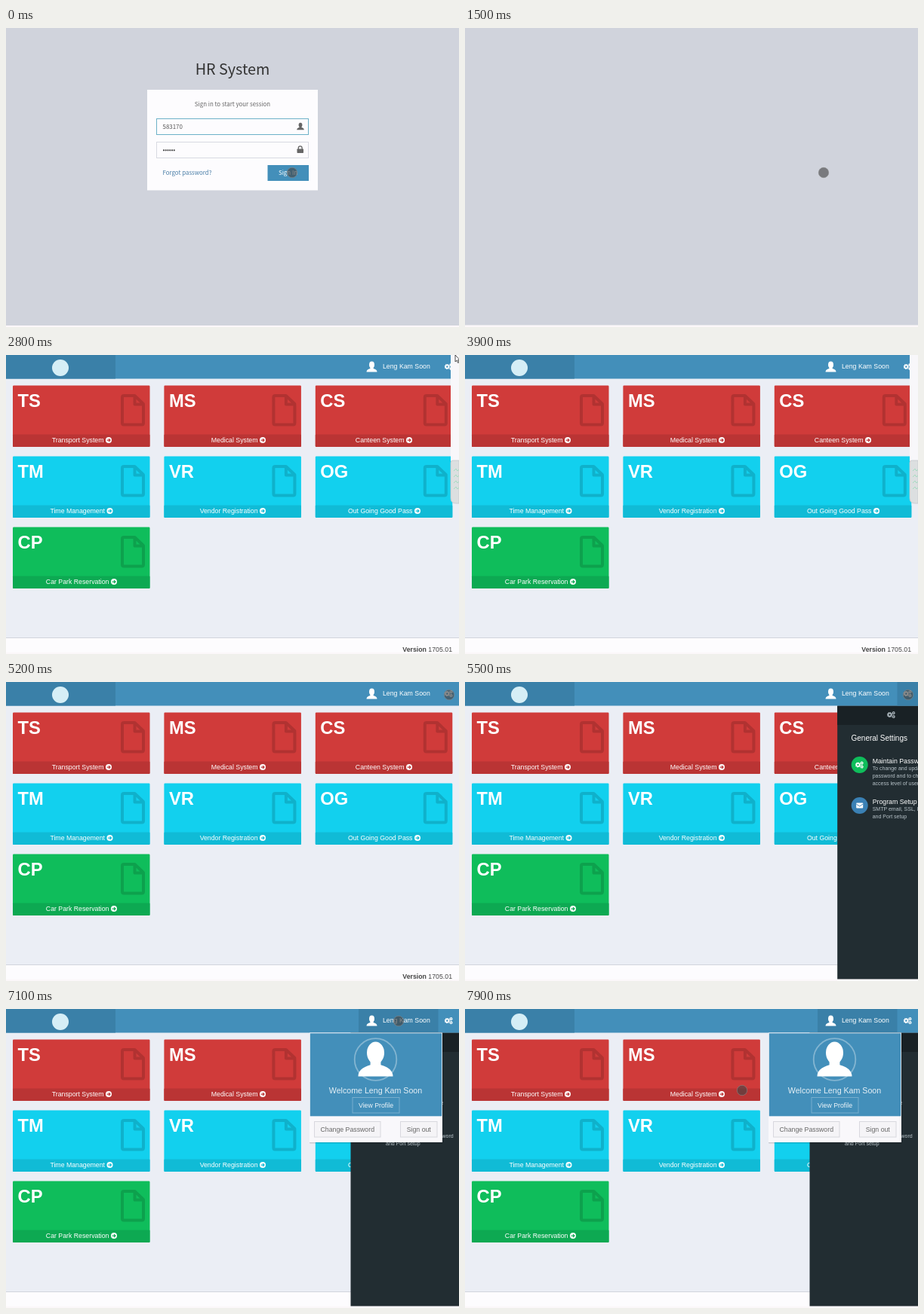
These frames come from a looping animation (600 px wide and 397 px high, 8 s). An HTML page:

```html
<!DOCTYPE html>
<html lang="en">
<head>
<meta charset="utf-8">
<title>HR System</title>
<style>
html, body { margin: 0; width: 100%; height: 100%; overflow: hidden; background: #d0d3dc; }
svg { display: block; width: 100vw; height: 100vh; }
text { font: 8.75px "Liberation Sans", Arial, sans-serif; white-space: pre; }
#login text { font: 7.9px "Noto Sans CJK SC", "Noto Sans CJK JP", "Noto Sans CJK", "Open Sans", sans-serif; }
#login .title { font-size: 19.8px; }
.code { font-size: 23.75px; font-weight: bold; }
.small { font-size: 7px; }
.mid { text-anchor: middle; }
.end { text-anchor: end; }
</style>
</head>
<body>
<svg id="stage" viewBox="0 0 600 397" preserveAspectRatio="none"></svg>
<script>
const PERIOD = 8000;
const USER = "Leng Kam Soon";
const BLUE = "#438fba", DARK_BLUE = "#3a80a8";

const rect = (x, y, w, h, fill, extra = "") =>
  `<rect x="${x}" y="${y}" width="${w}" height="${h}" fill="${fill}" ${extra}/>`;
const circle = (x, y, r, fill, extra = "") =>
  `<circle cx="${x}" cy="${y}" r="${r}" fill="${fill}" ${extra}/>`;
const path = (d, fill, extra = "") => `<path d="${d}" fill="${fill}" ${extra}/>`;
const text = (x, y, value, fill, cls = "", extra = "") =>
  `<text x="${x}" y="${y}" fill="${fill}" class="${cls}" ${extra}>${value}</text>`;
const group = (id, content) => `<g id="${id}">${content}</g>`;

function gear(x, y, r, fill) {
  const teeth = `stroke="${fill}" stroke-width="${r * 0.5}" stroke-dasharray="${r * 0.32} ${r * 0.308}"`;
  return circle(x, y, r * 0.6, "none", `stroke="${fill}" stroke-width="${r * 0.5}"`) +
    circle(x, y, r * 0.8, "none", teeth);
}
const cogs = (x, y, fill) =>
  gear(x - 1.7, y, 3.4, fill) + gear(x + 3.4, y - 2.4, 2.1, fill) + gear(x + 3.4, y + 2.5, 2.1, fill);

// Head and shoulders in a unit box centred on the origin
const person = (x, y, size, fill) =>
  `<g transform="translate(${x} ${y}) scale(${size})" fill="${fill}">
    <ellipse cy="-.18" rx=".25" ry=".32"/>
    <path d="M-.15 0h.3v.17q.35 .1 .35 .33H-.5q0-.23 .35-.33z"/></g>`;

function loginPage() {
  const dots = [...Array(6).keys()].map(i => circle(209 + i * 2.75, 162.3, 1.1, "#444")).join("");
  return rect(0, 0, 600, 395, "#d0d3dc") +
    text(300, 62, "HR System", "#333", "mid title") +
    rect(187, 82, 226, 133.5, "#fdfcfe") +
    text(300, 104, "Sign in to start your session", "#666", "mid") +
    rect(199.5, 120.5, 201, 21, "#fdfcfe", 'stroke="#6db1c8"') +
    rect(199.5, 151.5, 201, 21, "#fdfcfe", 'stroke="#d8dae2"') +
    text(207.5, 134, "583170", "#555") + dots +
    person(390, 130.5, 9.5, "#666") +
    rect(385.5, 160.5, 8.5, 5.5, "#666", 'rx=".7"') +
    path("M387.3 161v-1.8a2.4 2.4 0 0 1 4.8 0v1.8", "none", 'stroke="#666" stroke-width="1.3"') +
    text(207.5, 194.8, "Forgot password?", "#4b7fa8") +
    rect(346.5, 182, 54.5, 21, BLUE) +
    text(373.5, 194.8, "Sign In", "#fff", "mid");
}

function tile(column, row, code, label, arrowX, color, barColor) {
  const x = 9 + column * 200.4, y = 40.5 + row * 94;
  const sheet = `fill="none" stroke="#000" stroke-opacity=".15" stroke-width="4" stroke-linejoin="round"`;
  return rect(x, y, 181.5, 81.5, color, 'rx="1.2"') +
    rect(x, y + 65, 181.5, 16.5, barColor, 'rx="1"') +
    text(x + 6.5, y + 28.2, code, "#fff", "code") +
    `<path transform="translate(${x + 143} ${y + 11.5})" ${sheet}
      d="M4 2h14.5L30 13V38.500q0 2-2 2H4q-2 0-2-2V4q0-2 2-2zM18.500 3V13.500H29"/>` +
    text(arrowX - 6.5, y + 75.6, label, "#fff", "end") +
    circle(arrowX, y + 72.6, 4, "#fff") +
    path(`M${arrowX - 2.4} ${y + 72.6}h4.4m-2-2l2 2l-2 2`, "none", `stroke="${barColor}" stroke-width="1.2"`);
}

function dashboard() {
  const red = ["#d03b3a", "#ba3434"], cyan = ["#12d0ee", "#10bbd6"], green = ["#0fbd5b", "#0da952"];
  return rect(0, 0, 600, 395, "#ebeef5") +
    rect(0, 375, 600, 20, "#fdfcfe") + rect(0, 375, 600, 1, "#d2d4dc") +
    tile(0, 0, "TS", "Transport System", 136, ...red) +
    tile(1, 0, "MS", "Medical System", 340, ...red) +
    tile(2, 0, "CS", "Canteen System", 534, ...red) +
    tile(0, 1, "TM", "Time Management", 137.5, ...cyan) +
    tile(1, 1, "VR", "Vendor Registration", 340, ...cyan) +
    tile(2, 1, "OG", "Out Going Good Pass", 545, ...cyan) +
    tile(0, 2, "CP", "Car Park Reservation", 143, ...green) +
    text(591, 394, '<tspan font-weight="bold">Version</tspan> 1705.01', "#444", "end");
}

function header() {
  return rect(0, 0, 600, 31.5, BLUE) + rect(0, 0, 145, 31.5, DARK_BLUE) +
    circle(72, 17, 11, "#d5eef6") +
    group("userCell", rect(467, 0, 105.5, 31.5, DARK_BLUE)) +
    group("cogCell", rect(572.5, 0, 27.5, 31.5, DARK_BLUE)) +
    person(484.5, 15.5, 14, "#fff") +
    text(499, 18.3, USER, "#fff") + cogs(586, 15.5, "#fff");
}

function sidebar() {
  const grey = "#b8c3c9";
  const lines = (y, ...rows) => rows.map((row, i) => text(503, y + i * 10, row, grey, "small")).join("");
  return rect(456.5, 31.5, 144, 363, "#222d32") + rect(456.5, 31.5, 144, 25.5, "#192125") +
    cogs(527.5, 43.5, "#a9b4ba") +
    text(474.8, 78, "General Settings", "#fff", "", 'style="font-size:10px"') +
    circle(486, 110, 11, "#0fbd5b") + cogs(485.5, 110, "#fff") +
    text(503, 108, "Maintain Password", "#fff") +
    lines(117.3, "To change and update", "password and to change", "access level of user") +
    circle(486, 164, 11, "#3a80b4") + rect(481.5, 160.5, 9, 7, "#fff", 'rx=".8"') +
    path("M481.500 162l4.500 3l4.500-3", "none", 'stroke="#3a80b4" stroke-width=".9"') +
    text(503, 162, "Program Setup", "#fff") +
    lines(171.3, "SMTP email, SSL, Password", "and Port setup");
}

function userMenu() {
  const button = (x, y, w, label, fill, stroke, color) =>
    rect(x, y, w, 20.5, fill, `stroke="${stroke}"`) + text(x + w / 2, y + 13.2, label, color, "mid");
  return rect(402, 32, 177, 146.5, "#000", 'opacity=".15" rx="1"') +
    rect(402, 31.5, 176, 145.5, "#f9f8fb") + rect(402.8, 32.3, 174.4, 110, BLUE) +
    circle(489.5, 67, 27.8, "none", 'stroke="#83b5d1" stroke-width="1.8"') +
    person(489.5, 66.5, 46, "#fff") +
    text(489.5, 112, `Welcome ${USER}`, "#e6f0f6", "mid", 'style="font-size:10.65px"') +
    button(459, 117.5, 62, "View Profile", BLUE, "#77aecd", "#eef5f9") +
    button(408.5, 149.5, 87.5, "Change Password", "#f5f4f7", "#d8d8de", "#666") +
    button(522.5, 149.5, 48.5, "Sign out", "#f5f4f7", "#d8d8de", "#666");
}

function edgePanel() {
  const marks = [0, 1, 2, 3].map(i => `M593 ${154 + i * 8}l3-3l2 3l3-3`).join("");
  return rect(589, 0, 12, 141, "#f8f7fa") +
    path("M600 140H592q-3 0-3 3V190q0 7 7 7H600z", "#dcdfe0", 'stroke="#c5c8cc" stroke-width=".8"') +
    path(marks, "none", 'stroke="#a5dcc0" stroke-width="1"');
}

const stage = document.getElementById("stage");
stage.innerHTML =
  rect(0, 0, 600, 397, "#fbf7f9") +
  group("blank", rect(0, 0, 600, 394.5, "#d0d3dc")) +
  group("login", loginPage()) +
  group("home", dashboard() + group("sidebar", sidebar()) + header() + group("menu", userMenu())) +
  group("edge", edgePanel()) +
  group("arrow", path("M0 0V9l2-1.800l1.500 3.200l1.500-.7L3.500 6.600H6z", "#fff", 'stroke="#222" stroke-width=".8"')) +
  group("pointer", circle(0, 0, 6.7, "#444", 'fill-opacity=".62" stroke="#888" stroke-opacity=".6"'));

const part = id => document.getElementById(id);
const show = (id, on) => part(id).setAttribute("display", on ? "inline" : "none");
const move = (id, x, y) => part(id).setAttribute("transform", `translate(${x} ${y})`);
const clamp = v => Math.max(0, Math.min(1, v));
const ease = v => v * v * (3 - 2 * v);

// [time, x, y]
const route = [
  [0, 379, 192], [900, 379, 192], [1500, 475, 192], [1800, 475, 192], [2500, 608, 30],
  [4400, 608, 30], [4900, 587, 17], [5500, 587, 17], [6200, 540, 93], [6400, 540, 93],
  [6800, 520, 16], [7250, 520, 16], [7850, 367, 108], [PERIOD, 367, 108]
];

function pointerAt(t) {
  const next = Math.max(1, route.findIndex(stop => stop[0] > t));
  const [t0, x0, y0] = route[next - 1], [t1, x1, y1] = route[next];
  const k = ease((t - t0) / (t1 - t0));
  return [x0 + (x1 - x0) * k, y0 + (y1 - y0) * k];
}

function render(t) {
  const within = (from, to = PERIOD) => t >= from && t < to;
  show("login", within(0, 1000));
  show("home", within(1700));
  show("edge", within(2500, 4400));
  show("arrow", within(2500, 3100));
  show("sidebar", within(5300));
  show("cogCell", within(5300, 6800));
  show("userCell", within(6800));
  show("menu", within(7000));
  move("sidebar", 144 * (1 - ease(clamp((t - 5300) / 300))), 0);
  move("arrow", 595 + 6 * clamp((t - 2800) / 300), 0);
  move("pointer", ...pointerAt(t));
}

function tick(now) {
  render(now % PERIOD);
  requestAnimationFrame(tick);
}
render(0);
requestAnimationFrame(tick);
</script>
</body>
</html>
```
